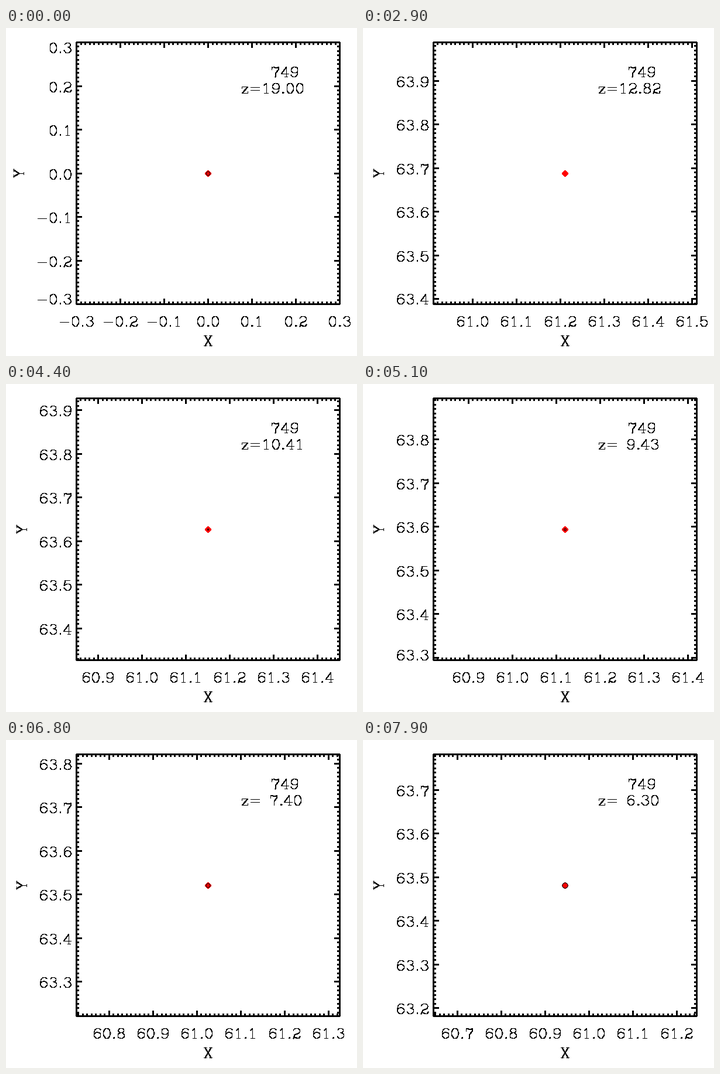
Write a matplotlib script that moves like this. It is 600 px wide and 560 px high and loops after 8 s.

```python
import matplotlib.pyplot as plt
import numpy as np
from matplotlib.animation import FuncAnimation
from matplotlib.patches import Circle, RegularPolygon

W, H, DPI = 600, 560, 100
FRAMES, STEP = 80, 100
LEFT, RIGHT, TOP, BOTTOM = 120.5, 570.5, 24.5, 471.5
CX, CY = 345.5, 248.5
SPAN = 0.3             # half the axis range
SCALE = 0.815          # pixels per glyph unit
PT = 72 / DPI
START = 23             # first frame in which the object has a position


def redshift(n):
    return 20 * np.exp(-0.012757 * n) - 1


def track(n):
    """Centre x, y and circle radius: a curved drift that bends late."""
    if n < START:
        return 0.0, 0.0, 3.2
    t, bend = n - 29, max(n - 61, 0)
    x = 61.2105 - 0.0038 * t - 1.4e-5 * t**2 - 0.0022 * bend
    y = 63.6885 - 0.0037 * t - 2.6e-5 * t**2 + 0.0024 * bend
    return x, y, 4.6 * ((n - START) / (FRAMES - 1 - START)) ** 1.4


# Stroke font: units with the baseline at 0 and the cap height at 21.
def line(*pts):
    return np.array(pts, float)


def bar(x, y, half=3):
    return line((x - half, y), (x + half, y))


def arc(cx, cy, rx, ry, a0=0, a1=360):
    t = np.radians(np.linspace(a0, a1, 25))
    return np.column_stack([cx + rx * np.cos(t), cy + ry * np.sin(t)])


def turned(strokes):
    return [np.array([20, 21]) - s for s in strokes]


six = [arc(10, 6.5, 7, 6.5), arc(11, 10.5, 8, 10.5, 45, 200)]
strokes = {
    " ": [],
    "0": [arc(10, 10.5, 7, 10.5)],
    "1": [line((6, 17), (10, 21), (10, 0)), bar(10, 0, 4)],
    "2": [arc(10, 15.5, 7, 5.5, 170, -45), line((15, 11.6), (6, 7), (3, 0)),
          line((3, 2), (6, 3), (12, 0), (15, 0), (17, 4))],
    "3": [arc(10, 16.5, 6, 4.5, 170, -90), arc(10, 6, 7, 6, 90, -170)],
    "4": [line((13, 0), (13, 21), (2, 6), (18, 6)), bar(13, 0)],
    "5": [line((15, 21), (5, 21), (3, 11)), arc(10, 7, 7, 7, 150, -160)],
    "6": six,
    "7": [line((3, 15), (3, 21)), arc(6.5, 17.5, 3.5, 3, 180, 60),
          line((8, 20), (13, 18), (17, 21), (16, 15), (11, 8), (10, 0))],
    "8": [arc(10, 16.5, 6, 4.5), arc(10, 6, 7, 6)],
    "9": turned(six),
    ".": [arc(5, 1, 1, 1)],
    "-": [bar(13, 9, 9)],
    "=": [bar(13, 12, 9), bar(13, 6, 9)],
    "z": [line((3, 10), (3, 14), (15, 14), (3, 0), (15, 0), (15, 4))],
    "X": [line((4, 21), (16, 0)), line((16, 21), (4, 0))]
         + [bar(x, y) for x in (4, 16) for y in (0, 21)],
    "Y": [line((4, 21), (10, 10), (10, 0)), line((17, 21), (10, 10)),
          bar(4, 21), bar(17, 21), bar(10, 0)],
}
widths = {" ": 16, ".": 10, "-": 26, "=": 26, "z": 18}


def pixel(v):
    return np.floor(v) + 0.5


def text(s, x, y, align=0.0, upright=False):
    """Strokes of s in pixels; align is 0 left, 0.5 centre, 1 right."""
    pen = -align * sum(widths.get(c, 20) for c in s)
    out = []
    for c in s:
        for p in strokes[c]:
            u, v = (p[:, 0] + pen) * SCALE, p[:, 1] * SCALE
            pts = [x - v, y - u] if upright else [x + u, y - v]
            out.append(pixel(np.column_stack(pts)))
        pen += widths.get(c, 20)
    return out


def joined(parts):
    gap = np.full((1, 2), np.nan)
    return np.vstack([piece for p in parts for piece in (p, gap)]).T


def ticks(center, mid, per_unit):
    """Pixel, length and label (or None) of every tick on one axis."""
    lo = int(np.ceil((center - SPAN) * 100 - 1e-6))
    hi = int(np.floor((center + SPAN) * 100 + 1e-6))
    for k in range(lo, hi + 1):
        major = k % 10 == 0
        p = pixel(mid + (k / 100 - center) * per_unit)
        yield p, 9 if major else 4, f"{k / 100:.1f}" if major else None


fig = plt.figure(figsize=(W / DPI, H / DPI), dpi=DPI, facecolor="white")
ax = fig.add_axes([0, 0, 1, 1])
ax.set_xlim(0, W)
ax.set_ylim(H, 0)
ax.axis("off")

style = dict(color="black", antialiased=False, snap=False)
rules, = ax.plot([], [], lw=3 * PT, solid_capstyle="butt", **style)
words, = ax.plot([], [], lw=PT, solid_capstyle="projecting",
                 solid_joinstyle="round", **style)
ax.add_patch(RegularPolygon((CX, CY), 4, radius=5.4, fc="red", ec="none",
                            antialiased=False, zorder=3))
ring = ax.add_patch(Circle((CX, CY), 1, fc="red", ec="black", lw=PT, zorder=4))


def draw(n):
    x, y, r = track(n)
    segs = [line((LEFT, v), (RIGHT, v)) for v in (TOP, BOTTOM)]
    segs += [line((v, TOP), (v, BOTTOM)) for v in (LEFT, RIGHT)]
    label = text("749", 452.5, 83.5) + text(f"z={redshift(n):5.2f}", 401, 111.5)
    label += text("X", CX, 542.5, 0.5)
    label += text("Y", 30.5 if n < START else 35.5, CY, 0.5, upright=True)

    for p, size, name in ticks(x, CX, (RIGHT - LEFT) / (2 * SPAN)):
        segs += [line((p, TOP), (p, TOP + size)),
                 line((p, BOTTOM), (p, BOTTOM - size))]
        if name:
            label += text(name, p, 509.5, 0.5)
    for p, size, name in ticks(y, (TOP + BOTTOM) / 2, (TOP - BOTTOM) / (2 * SPAN)):
        segs += [line((LEFT, p), (LEFT + size, p)),
                 line((RIGHT, p), (RIGHT - size, p))]
        if name:
            label += text(name, 113.5, np.clip(p + 10, 42.5, 471.5), 1)

    rules.set_data(*joined(segs))
    words.set_data(*joined(label))
    ring.set_radius(r)
    ring.set_visible(r > 0.5)
    return rules, words, ring


anim = FuncAnimation(fig, draw, frames=FRAMES, interval=STEP, repeat=True,
                     repeat_delay=0, blit=False)
plt.show()
```
